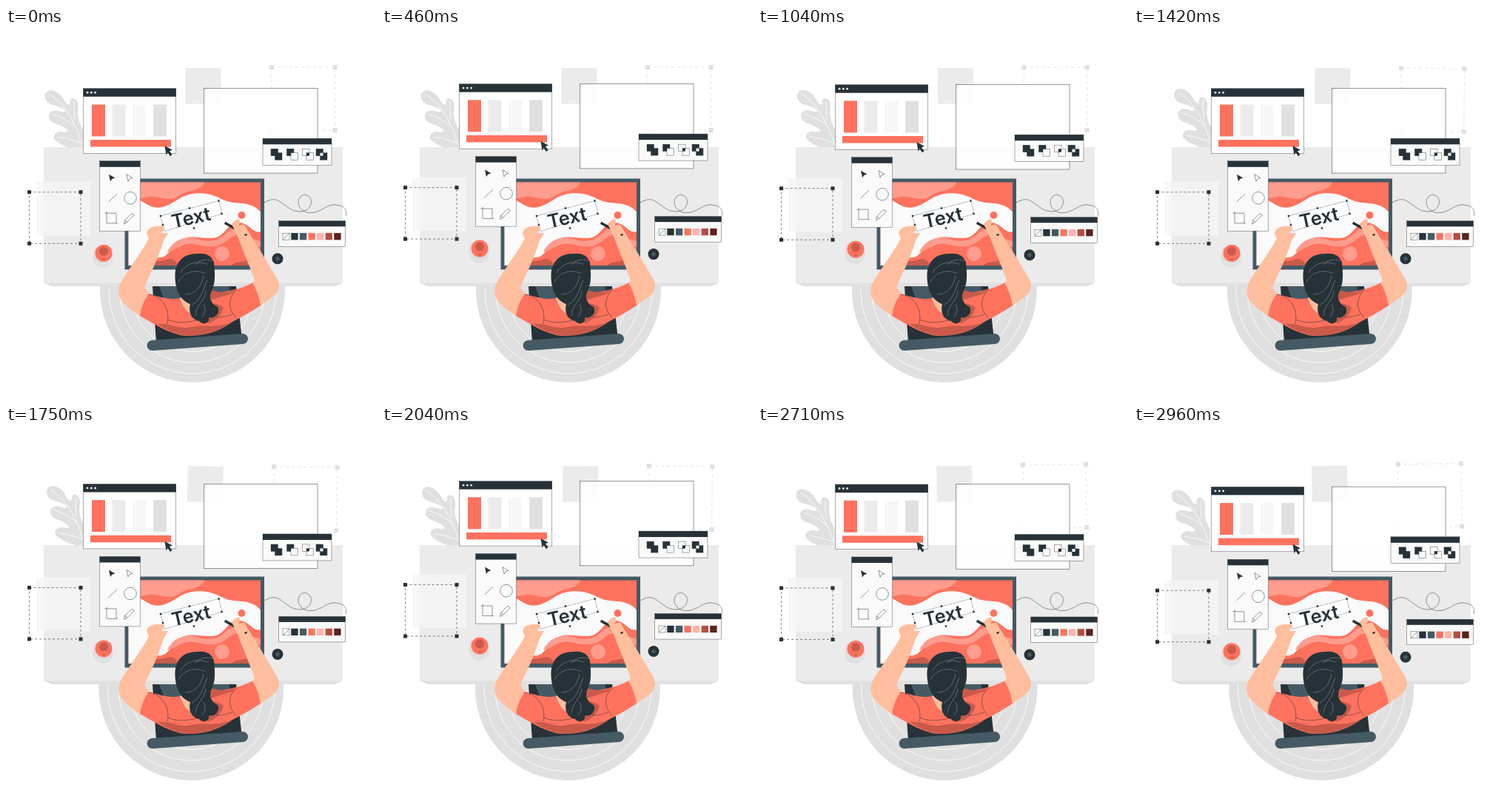
Animation of 500 by 500 pixels, one loop 3000 ms. Source, as an HTML page:

```html
<!DOCTYPE html>
<html lang="en">
<head>
<meta charset="utf-8">
<title>Designer at work</title>
<style>
  html, body { margin: 0; width: 100%; height: 100%; overflow: hidden; background: #fff; }
  svg { display: block; width: 100%; height: 100%; }
  .ink { fill: none; stroke: #263238; stroke-width: .5; }
  .strand { fill: none; stroke: #b8bec1; stroke-width: .4; }
  .dark { fill: #263238; }
  .slate { fill: #455a64; }
  .red { fill: #ff725e; }
  .shade { fill: #c95a4a; }
  .light { fill: #ff9c8e; }
  .skin { fill: #ffbe9d; }
  .pale { fill: #e0e0e0; }
  .vein { fill: none; stroke: #fff; stroke-width: .8; }
</style>
</head>
<body>
<svg viewBox="0 0 500 500">
  <defs><clipPath id="screen"><rect x="165.500" y="208.500" width="178.500" height="112.500"/></clipPath></defs>

  <g id="backdrop">
    <circle class="pale" cx="252" cy="354" r="125"/>
    <g class="vein" id="rings"></g>
    <path class="pale" d="M104 165C88 164 75 159 66 151C62 146 67 139 75 140C80 141 83 141 84 139
      C80 134 75 132 69 130C61 128 57 123 58 117C60 110 68 111 74 113C77 114 80 114 80 112
      C77 107 70 106 63 104C54 102 50 93 54 87C59 81 69 85 75 92C79 97 81 104 86 104
      C87 101 85 95 91 95C99 97 98 108 97 116C97 125 101 131 104 138Z"/>
    <path class="vein" d="M58 89C78 101 93 125 104 160M62 116Q80 122 93 132M69 147Q88 150 101 155M92 99Q91 113 93 125"/>
    <rect x="242.500" y="54" width="48" height="48.500" fill="#ebebeb"/>
    <rect x="359" y="53" width="85.500" height="85" fill="none" stroke="#e0e0e0" stroke-width=".8" stroke-dasharray="4 4"/>
    <g class="pale" id="paleGrips"></g>
  </g>

  <rect x="51" y="161" width="404" height="184" fill="#ebebeb"/>
  <path class="pale" d="M51 344.500H455L444 349H62Z"/>
  <path class="ink" d="M349 236C358 231 363 230 371 235C380 241 386 248 397 248C409 248 414 239 412 232C410 225 401 223 397 229C392 237 397 246 406 249C422 253 432 239 442 239C454 239 462 243 459 254"/>

  <path class="slate" d="M160.500 203.500H349V326.500H160.500Z"/>
  <g clip-path="url(#screen)">
    <rect class="red" x="165" y="208" width="180" height="114"/>
    <path class="light" d="M165 208H268C264 219 252 219 243 222C234 225 231 231 221 231C209 231 205 227 195 228C184 229 178 233 165 231Z"/>
    <path d="M165 231C181 229 186 237 196 241C208 246 221 239 232 232C244 224 257 222 271 224C288 227 294 235 308 236C324 237 336 238 345 250
      V275C333 279 329 262 313 263C297 264 297 284 277 284C256 284 246 278 232 290C219 301 219 312 203 310C187 308 188 322 178 324H165Z" fill="#fafafa"/>
    <path class="light" d="M218 303C223 290 240 279 258 285C278 292 291 285 300 275C309 267 321 272 326 281C331 287 338 284 345 289V296
      C333 293 326 291 320 283C313 277 305 281 298 288C285 298 270 296 255 292C240 289 232 299 218 303Z"/>
    <path class="shade" d="M187 322C194 312 207 317 216 313C226 310 231 315 232 322Z"/>
    <path class="shade" d="M304 322C309 314 319 318 327 313C335 309 337 302 345 301V322Z"/>
    <circle class="light" cx="292" cy="305" r="10"/>
    <circle class="red" cx="318.500" cy="253" r="5"/>
  </g>

  <g id="floaters"></g>

  <path class="dark" d="M198 349H311L319 421L203 426Z"/>
  <path class="slate" d="M207 349H301L306 366L216 373Z"/>
  <path d="M197.500 429L320 420" stroke="#455a64" stroke-width="14" stroke-linecap="round"/>
  <path class="skin" d="M195 281C183 304 165 326 154 346Q149 360 157 369Q168 381 181 389L194 360L187 350C195 332 207 310 214 283L210 277Z"/>
  <path class="skin" d="M327 274C342 298 356 321 367 340Q373 353 361 363L343 376L331 346L336 341C330 323 322 306 313 281Z"/>
  <path class="red" d="M193 359C207 363 219 368 236 365L276 359C295 357 315 354 333 344.500Q341 357 344 375C330 384 318 391 306 397
    C293 407 274 414 249 416C226 417 204 402 181 389Q183 373 193 359Z"/>
  <path class="shade" d="M276 354C290 358 301 358 311 353L305 359L276 368Z"/>
  <path class="shade" d="M205 400C222 398 234 408 251 404C269 400 281 407 306 397C287 412 266 416 246 416Q224 414 205 400Z"/>
  <path class="shade" d="M262 382Q278 366 294 378Q290 393 275 399Q263 398 262 382Z"/>
  <path class="ink" d="M193 360C212 363 222 380 218 400M218 394C235 401 252 397 264 393M312 354C300 363 299 381 311 391M284 391Q295 391 306 387"/>
  <path class="skin" d="M235 364Q241 365 248 372Q255 381 250 386Q240 382 235 364Z"/>
  <path class="dark" d="M259 305C239 305 228 316 228.500 337C229 356 237 369 249 373C246 385 251 394 261 396
    C266 402 276 399 274 391C284 394 290 383 286 377C276 372 274 364 278 355C284 343 282 329 281 317Q276 303 259 305Z"/>
  <path class="strand" d="M236 331C242 318 258 314 272 319M233 343C240 330 254 325 270 332M242 360C255 360 263 352 267 335
    M256 320Q265 310 279 314M251 374C263 369 267 352 272 340M256 389C257 372 269 370 270 355M265 391Q272 382 267 373"/>

  <path d="M208.500 254L287.500 233.500L292 251L214.500 274.500Z" fill="#fff" stroke="#455a64" stroke-width=".4"/>
  <text transform="translate(252 265) rotate(-12.500)" text-anchor="middle" font-family="Inter, Lato, sans-serif" font-size="25.500" font-weight="600" class="dark">Text</text>
  <g class="dark" id="labelGrips"></g>
  <path class="skin" d="M190 277C192 268 202 267 212 268L214 272L210 277L219 277Q217 281 213 287L193 285Z"/>
  <path d="M297 264L324 279" stroke="#263238" stroke-width="3.600" stroke-linecap="round"/>
  <path class="skin" d="M305 265Q311 257 316 259L315 268Q319 264 323 267L328 276L314 284Z"/>
</svg>

<script>
const byId = id => document.getElementById(id);
const rect = (x, y, w, h, fill, extra = '') =>
  `<rect x="${x}" y="${y}" width="${w}" height="${h}" fill="${fill}" ${extra}/>`;
const path = (d, cls = 'ink') => `<path class="${cls}" d="${d}"/>`;
const dot = (x, y, r, cls) => `<circle class="${cls}" cx="${x}" cy="${y}" r="${r}"/>`;
const grips = (points, size, fill) =>
  points.map(([x, y]) => rect(x - size / 2, y - size / 2, size, size, fill)).join('');
const corners = (x, y, w, h) => [[x, y], [x + w, y], [x + w, y + h], [x, y + h]];

const DARK = '#263238', RED = '#ff725e', WHITE = '#fafafa';
const THIN = `stroke="${DARK}" stroke-width=".4"`;

const panel = (x, y, w, h, head, fill = WHITE) =>
  rect(x, y, w, h, fill, THIN) + rect(x, y, w, head, DARK);

function browser() {
  const bars = [[116, RED], [143.5, '#ebebeb'], [170.5, '#f7f7f7'], [199, '#e0e0e0']];
  return panel(104.3, 82, 125.5, 87.5, 11, '#fff') +
    [110, 115.3, 120.6].map(x => `<circle cx="${x}" cy="87.500" r="1.400" fill="#fff"/>`).join('') +
    bars.map(([x, c]) => rect(x, 103.7, 18, 43, c)).join('') +
    rect(114, 151.3, 109, 9.5, RED) +
    path('M214.500 159.500L225 165L221 166.500L224.500 171.500L222 173.500L218.500 168.500L216.500 172Z', 'dark');
}

function tools() {
  return panel(126.5, 180, 55, 94.5, 8) +
    path('M139 198L147.500 203L143.500 204L141 207.500Z', 'dark') +
    path('M163 198L171 203L167 204L165 207.500Z') +
    path('M138.500 235.500L150 224.500') + dot(168, 230, 8.3, 'ink') +
    path('M136 248V264H149V250.500H133.500M149 264H151') +
    path('M159.500 265L160.500 260L169 251.500Q172 250 173 253.500L164 262.500ZM160.500 260L164 262.500');
}

function shapes() {
  const pair = (x, back, front, mid) =>
    rect(x, 163.5, 9.5, 9.5, back, THIN) + rect(x + 5.5, 169, 9.5, 9.5, front, THIN) +
    (mid ? rect(x + 5.5, 169, 4, 4, mid) : '');
  return panel(347, 149.5, 93, 36, 8) +
    pair(358, DARK, DARK) + pair(379.5, DARK, WHITE) +
    pair(400.5, WHITE, WHITE, DARK) + pair(419, DARK, DARK, WHITE);
}

function palette() {
  const colors = [DARK, '#455a64', RED, '#ffb4aa', '#b34f42', '#59251f'];
  return panel(368.7, 261, 90, 34.5, 7.5) +
    rect(374, 277.5, 9, 9, WHITE, THIN) + path('M374 286.500L383 277.500') +
    colors.map((c, i) => rect(385.3 + i * 11.6, 277.3, 9.3, 9.3, c)).join('');
}

function mug() {
  return path('M120 297Q117 304 117.500 312A13.500 12.500 0 0 0 144.500 311L142 296Z', 'pale') +
    dot(132, 304.5, 11.5, 'red') + dot(132, 302, 6, 'shade') +
    path('M130 312Q132 314 134.500 312');
}

byId('rings').innerHTML = [113, 98, 83].map(r => `<circle cx="252" cy="354" r="${r}"/>`).join('');
byId('paleGrips').innerHTML = grips(corners(359, 53, 85.5, 85), 6, '#e0e0e0');
byId('labelGrips').innerHTML =
  grips([[209, 254], [248, 243.5], [287.5, 233.5], [291.5, 251], [254, 270.5], [212, 266]], 2.4, DARK);
byId('floaters').innerHTML =
  rect(267.5, 81.8, 153.5, 114.5, '#fff', `fill-opacity=".9" stroke="${DARK}" stroke-width=".5"`) +
  browser() + shapes() +
  rect(41, 208, 73, 73, '#f5f5f5', 'fill-opacity=".8"') +
  rect(31.5, 222, 69.5, 69.5, 'none', `stroke="${DARK}" stroke-width=".6" stroke-dasharray="3 3"`) +
  grips(corners(31.5, 222, 69.5, 69.5), 5, DARK) +
  tools() + palette() + mug() +
  dot(367, 312, 7.5, 'dark') + dot(367, 312, 2.8, 'slate');

const LOOP = 3000, LEAD = 40;

function draw(now) {
  const t = now % LOOP + LEAD;

  // Bob up 10 px and back every 1.5 s.
  const phase = t % 1500 / 750;
  const lift = 10 * (1 - Math.abs(1 - phase));
  byId('floaters').setAttribute('transform', `translate(0 ${0.3 - lift})`);

  // After one second, sway linearly to +1 degree and then back through zero.
  const sway = t < 1000 ? 0 : 1 - Math.abs(t - 1750) / 750;
  byId('backdrop').setAttribute('transform', `rotate(${sway} 250 250)`);
}

const start = performance.now();
function tick() {
  draw(performance.now() - start);
  requestAnimationFrame(tick);
}
tick();
</script>
</body>
</html>
```
